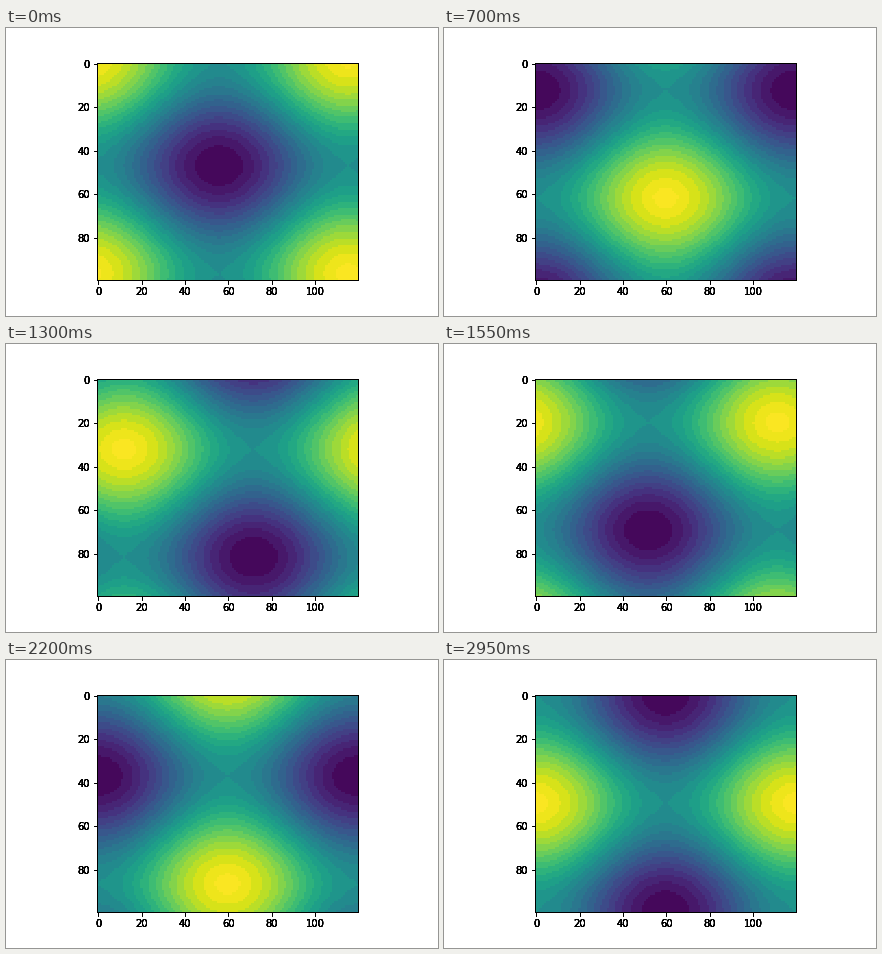
Recreate the animation shown at these times as a matplotlib script. Size 432 px wide and 288 px high, loop 3000 ms.

```python
import matplotlib.pyplot as plt
import numpy as np
from matplotlib.animation import FuncAnimation
from matplotlib.colors import BoundaryNorm, ListedColormap

FRAMES, INTERVAL = 60, 50
COLS, ROWS = 120, 100
INK_PASSES = 6

plt.rcParams.update({"font.family": "DejaVu Sans", "font.size": 10})

x = np.linspace(0, 2 * np.pi, COLS)
y = np.linspace(0, 2 * np.pi, ROWS).reshape(-1, 1)


def wave(i):
    """Field at step i, scaled to 0..1."""
    z = np.cos(x + (i + 1) * np.pi / 15) + np.cos(y + (i + 1) * np.pi / 20)
    return (z - z.min()) / (z.max() - z.min())


def style(ax):
    ax.set_aspect("equal")
    ax.set_xlim(-0.5, COLS - 0.5)
    ax.set_ylim(ROWS - 0.5, -0.5)
    ax.set_xticks(range(0, COLS - 10, 20))
    ax.set_yticks(range(0, ROWS, 20))


# Flat colour bands, with a narrow extra one at the peak
edges = np.append(np.arange(24) / 24, [0.989, 1.0])
bands = ListedColormap(plt.get_cmap("viridis")((edges[:-1] + edges[1:]) / 2))
norm = BoundaryNorm(edges, bands.N, clip=True)

fig = plt.figure(figsize=(6, 4), dpi=72, facecolor="white")
box = [0.125, 0.125, 0.775, 0.755]
ax = fig.add_axes(box)
image = ax.imshow(wave(0), cmap=bands, norm=norm, interpolation="nearest")
style(ax)

# Repeated passes turn the soft edges of frame and labels solid black
for k in range(1, INK_PASSES):
    ink = fig.add_axes(box, label=f"ink{k}")
    ink.patch.set_visible(False)
    style(ink)


def update(i):
    image.set_data(wave(i))
    return [image]


anim = FuncAnimation(fig, update, frames=FRAMES, interval=INTERVAL,
                     repeat=True, blit=False)
plt.show()
```
